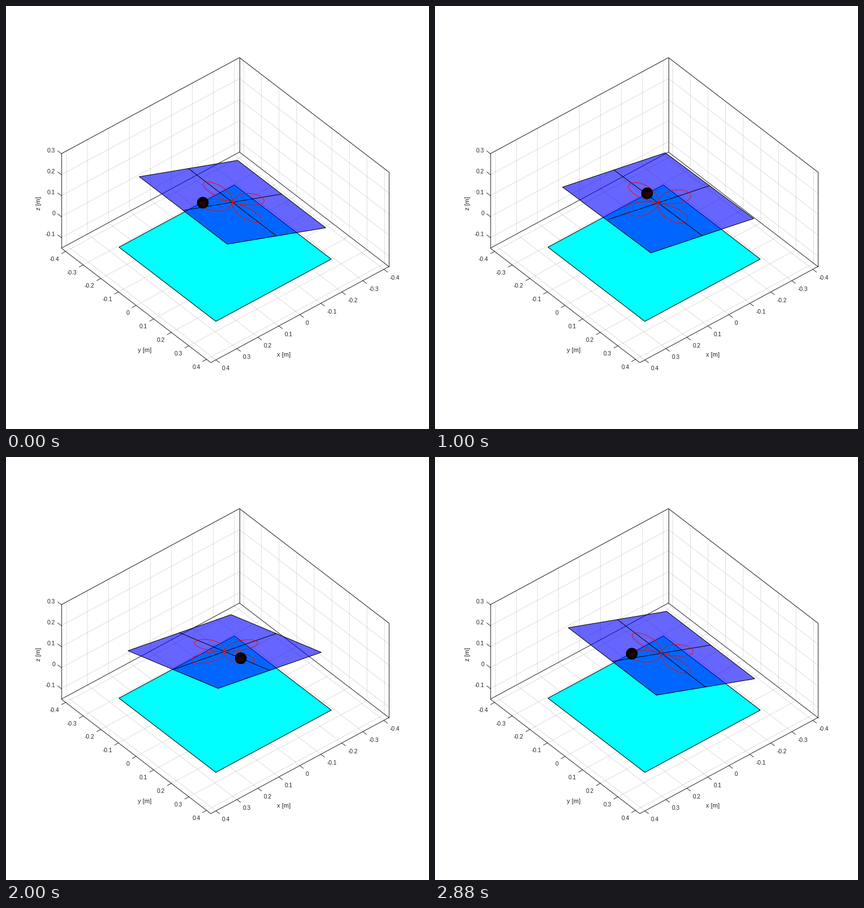
These frames come from a looping animation (748x748 px, 2920 ms). A matplotlib script:

```python
import numpy as np
import matplotlib.pyplot as plt
from matplotlib.animation import FuncAnimation
from matplotlib.patches import Circle, Polygon

SIZE, FRAMES, INTERVAL = 748, 73, 40
SCALE = 484.5                      # pixels per metre
ANGLE = np.radians(40)             # azimuth and elevation of the view
C, S = np.cos(ANGLE), np.sin(ANGLE)
ORIGIN = np.array([387, 388.3])
RIGHT = np.array([-C, S, 0])
DOWN = np.array([S * S, C * S, -C])
TOWARD = np.array([S * C, C * C, S])

LIM, Z_MIN, Z_MAX = 0.4243, -0.15, 0.3
BASE, PLATE, HEIGHT = 0.275, 0.25, 0.1
PETAL, RADIUS = 0.15, 0.02
INK = (0.15, 0.15, 0.15)
FONT = "Liberation Sans"

fig = plt.figure(figsize=(SIZE / 72, SIZE / 72), dpi=72, facecolor="white")
ax = fig.add_axes([0, 0, 1, 1])
ax.set_xlim(-0.5, SIZE - 0.5)
ax.set_ylim(SIZE - 0.5, -0.5)
ax.axis("off")


def project(points):
    points = np.asarray(points, float)
    flat = np.stack([points @ RIGHT, points @ DOWN], axis=-1)
    return ORIGIN + SCALE * flat


def path(points, color, z, width=1.0):
    xy = project(points)
    return ax.plot(xy[:, 0], xy[:, 1], color=color, lw=width, zorder=z)[0]


def square(half, z):
    return np.array([(-half, -half, z), (half, -half, z),
                     (half, half, z), (-half, half, z)])


def label(x, y, text, size=10.3, **kw):
    ax.text(x, y, text, size=size, color=INK, family=FONT,
            va="center", zorder=3, **kw)


def tick(point, direction, text, dx, dy, align):
    p = project(point)
    step = project(direction) - ORIGIN
    end = p + 8 * step / np.hypot(*step)
    ax.plot(*zip(p, end), color=INK, lw=0.9, zorder=2)
    label(p[0] + dx, p[1] + dy, text, ha=align)


def draw_axes():
    grid = (*INK, 0.15)
    for i in range(-4, 5):
        v = round(i / 10, 1)
        path([(v, LIM, Z_MIN), (v, -LIM, Z_MIN), (v, -LIM, Z_MAX)], grid, 1)
        path([(LIM, v, Z_MIN), (-LIM, v, Z_MIN), (-LIM, v, Z_MAX)], grid, 1)
        tick((v, LIM, Z_MIN), (0, 1, 0), f"{v:g}", 10.3, 15.5, "left")
        tick((LIM, v, Z_MIN), (1, 0, 0), f"{v:g}", -11.3, 13.7, "right")
    for i in range(-1, 4):
        v = round(i / 10, 1)
        path([(LIM, -LIM, v), (-LIM, -LIM, v), (-LIM, LIM, v)], grid, 1)
        tick((LIM, -LIM, v), (0, -1, 0), f"{v:g}", -11, -5.5, "right")

    floor = square(LIM, Z_MIN)
    path(np.vstack([floor, floor[:1]]), INK, 2)
    path([(LIM, -LIM, Z_MAX), (-LIM, -LIM, Z_MAX), (-LIM, LIM, Z_MAX)], INK, 2)
    for x, y in ((LIM, -LIM), (-LIM, -LIM), (-LIM, LIM)):
        path([(x, y, Z_MIN), (x, y, Z_MAX)], INK, 2)

    label(491, 617, "x [m]", 11.3, ha="center")
    label(245, 609, "y [m]", 11.3, ha="center")
    label(58, 348, "z [m]", 11.3, ha="center", rotation=90)


def sphere_mesh():
    """Visible half of a latitude/longitude mesh, as pixel offsets."""
    lat = np.linspace(-np.pi / 2, np.pi / 2, 41)
    lon = np.linspace(0, 2 * np.pi, 81)
    rings = [(np.full_like(lon, a), lon) for a in lat[::2]]
    rings += [(lat, np.full_like(lat, b)) for b in lon[:-1:4]]
    parts = []
    for a, b in rings:
        p = np.stack([np.cos(a) * np.cos(b), np.cos(a) * np.sin(b),
                      np.sin(a)], axis=-1)
        xy = project(RADIUS * p) - ORIGIN
        xy[p @ TOWARD < 0] = np.nan
        parts += [xy, [(np.nan, np.nan)]]
    return np.vstack(parts)


def rotation(alpha, beta):
    ca, sa, cb, sb = np.cos(alpha), np.sin(alpha), np.cos(beta), np.sin(beta)
    roll = np.array([[1, 0, 0], [0, ca, -sa], [0, sa, ca]])
    pitch = np.array([[cb, 0, sb], [0, 1, 0], [-sb, 0, cb]])
    return pitch @ roll


def rose(theta, first, third):
    """Sum of the two circular motions that make a four-petal rose."""
    return first * np.exp(-1j * theta) + third * np.exp(3j * theta)


draw_axes()
ax.add_patch(Polygon(project(square(BASE, -0.13)), fc="cyan", ec="black",
                     lw=1, zorder=4))

corners = square(PLATE, HEIGHT)
cross = [np.array([(-PLATE, 0, HEIGHT), (PLATE, 0, HEIGHT)]),
         np.array([(0, -PLATE, HEIGHT), (0, PLATE, HEIGHT)])]
curve = rose(np.linspace(0, 2 * np.pi, 241), PETAL / 2, PETAL / 2)
petals = np.stack([curve.real, curve.imag, np.full(241, HEIGHT)], axis=-1)
mesh = sphere_mesh()

plate = ax.add_patch(Polygon(project(corners), fc=(0, 0, 1, 0.6), ec="black",
                             lw=1, joinstyle="round", zorder=5))
cross_lines = [path(c, "black", 6) for c in cross]
petal_line = path(petals, "red", 7, 0.9)
ball = ax.add_patch(Circle((0, 0), RADIUS * SCALE, fc="red", ec="black",
                           lw=1, zorder=8))
ball_mesh = ax.plot([], [], color="black", lw=0.9, zorder=9)[0]


def update(i):
    turn = np.interp(i, [0, 9, 25, 36, 44, 55, 72],
                     [0, 45.8, 126.2, 180, 221, 278.6, 360])
    theta = np.radians(turn)
    tilt = rose(theta, 5.05, 15.4)
    spot = PETAL / 2 * rose(theta, 1.15, 0.96)
    rot = rotation(np.radians(tilt.imag), np.radians(-tilt.real))

    plate.set_xy(project(corners @ rot.T))
    for line, pts in zip(cross_lines + [petal_line], cross + [petals]):
        line.set_data(*project(pts @ rot.T).T)
    center = project(rot @ [spot.real, spot.imag, HEIGHT + RADIUS])
    ball.center = tuple(center)
    ball_mesh.set_data(*(mesh + center).T)
    return [plate, *cross_lines, petal_line, ball, ball_mesh]


anim = FuncAnimation(fig, update, frames=FRAMES, interval=INTERVAL,
                     repeat=True, repeat_delay=0, blit=False)
plt.show()
```
